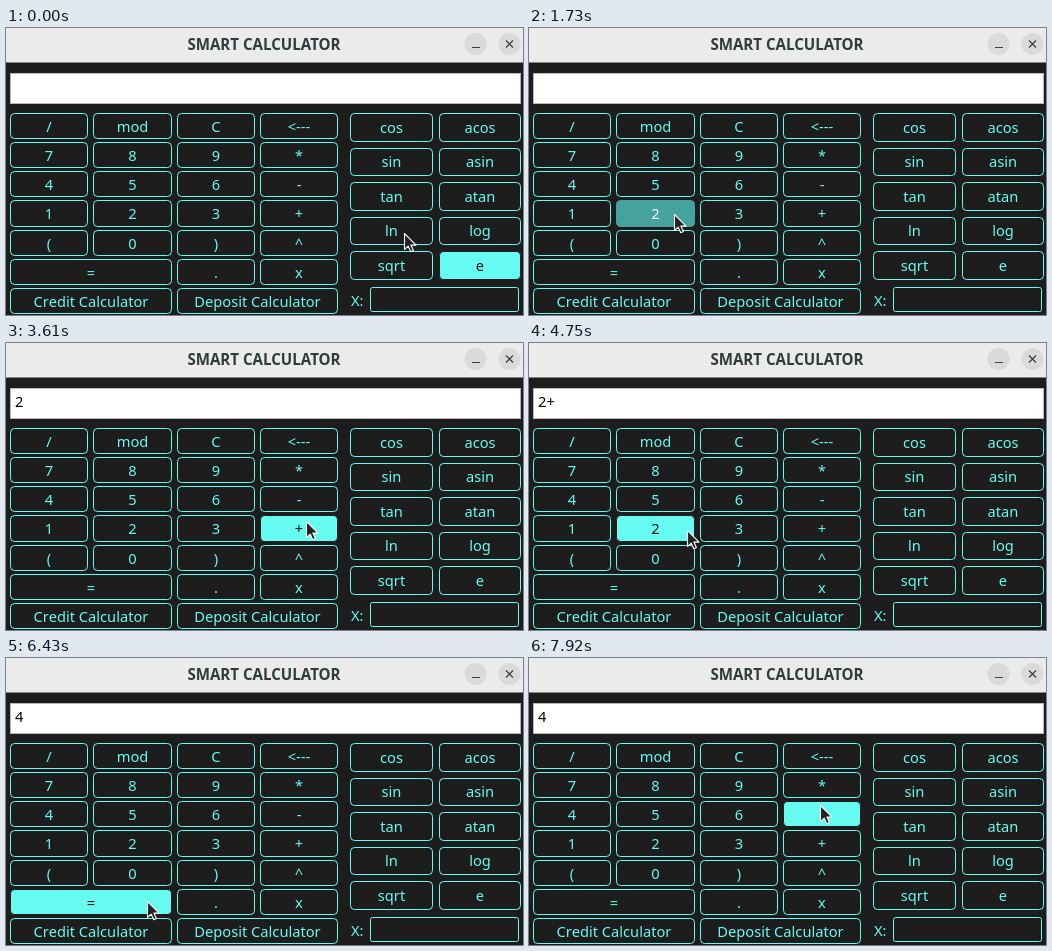
Recreate the animation shown at these times as an HTML page. Size 517x287 px, loop 8000 ms.

```html
<!DOCTYPE html>
<html lang="en">
<head>
<meta charset="utf-8">
<title>Smart Calculator</title>
<style>
  html, body { margin: 0; width: 100%; height: 100%; overflow: hidden; background: #1d1d1d; }
  svg { display: block; width: 517px; height: 287px; }
  text { font: 14.67px "Noto Sans", "Open Sans", sans-serif; fill: #66fcf1; }
  .title { font-size: 15.1px; font-weight: 700; fill: #303b3c; }
  .mid { text-anchor: middle; }
  .btn rect { fill: #1d1d1d; stroke: #66fcf1; }
  .hover rect { fill: #66fcf1; stroke: #1d1d1d; }
  .hover text { fill: #111; }
  .pressed rect { fill: #45a29e; stroke: #45a29e; }
  .pressed text { fill: #fff; }
</style>
</head>
<body>
<svg viewBox="0 0 517 287">
  <rect width="517" height="287" fill="#1d1d1d"/>
  <rect width="517" height="34.5" fill="#ebebeb"/>
  <text class="title mid" x="258" y="22">SMART CALCULATOR</text>
  <g fill="#dadada"><circle cx="469.5" cy="16" r="11"/><circle cx="503.5" cy="16" r="11"/></g>
  <path d="M466 19.5h8M500 12.5l7 7m0-7l-7 7" fill="none" stroke="#3d3d3d" stroke-width="1.2"/>
  <rect x="4.5" y="45.5" width="510" height="30" fill="#fff" stroke="#b8b8b8"/>
  <text id="display" x="9" y="64" style="fill:#000"></text>
  <g id="buttons"></g>
  <text x="345" y="278">X:</text>
  <rect x="364.5" y="259.5" width="148" height="24" rx="2" fill="none" stroke="#66fcf1"/>
  <path id="cursor" d="M.5 .5V16.5L4.2 13.2 6.8 18.8 9.4 17.6 6.9 12.1H12Z" fill="#222" stroke="#fff" stroke-width="1.1" stroke-linejoin="round"/>
</svg>
<script>
const LOOP = 8000;
const TICK = 67.2;
const NS = "http://www.w3.org/2000/svg";
const byId = id => document.getElementById(id);
const buttons = [];

function add(parent, tag, attrs) {
  const node = document.createElementNS(NS, tag);
  for (const key in attrs) node.setAttribute(key, attrs[key]);
  return parent.appendChild(node);
}

function addButton(label, left, top, right, bottom, baseline) {
  const node = add(byId("buttons"), "g", { class: "btn" });
  add(node, "rect", { x: left + .5, y: top + .5, width: right - left - 1, height: bottom - top - 1, rx: 4 });
  const text = add(node, "text", { class: "mid", x: (left + right) / 2, y: baseline });
  text.textContent = label;
  buttons.push({ label, left, top, right, bottom, node });
}

// Labels are split by spaces; "~" widens the button on its left, "_" is a space.
function addGrid(rows, { x, y, w, h, stepX, stepY, baseline }) {
  rows.forEach((row, r) => {
    const cells = row.split(" ");
    const top = y + r * stepY;
    cells.forEach((label, c) => {
      if (label === "~") return;
      const end = cells[c + 1] === "~" ? c + 1 : c;
      const box = [x + c * stepX, top, x + end * stepX + w, top + h, top + baseline];
      addButton(label.replace("_", " "), ...box.map(Math.round));
    });
  });
}

addGrid(
  ["/ mod C <---", "7 8 9 *", "4 5 6 -", "1 2 3 +", "( 0 ) ^", "= ~ . x", "Credit_Calculator ~ Deposit_Calculator ~"],
  { x: 4, y: 84.8, w: 78.2, h: 26.2, stepX: 83.4, stepY: 29.2, baseline: 19 }
);
addGrid(
  ["cos acos", "sin asin", "tan atan", "ln log", "sqrt e"],
  { x: 344, y: 85, w: 82.6, h: 28.9, stepX: 88.6, stepY: 34.5, baseline: 19.9 }
);

// Each pointer move: start, end, and where it comes to rest.
const origin = { x: 398, y: 205 };
const moves = [
  { from: 0, to: 260, x: 236, y: 223 },
  { from: 510, to: 1310, x: 145, y: 186 },
  { from: 2000, to: 2660, x: 178, y: 184 },
  { from: 2680, to: 3530, x: 300, y: 178 },
  { from: 3880, to: 4740, x: 158, y: 187 },
  { from: 5020, to: 5490, x: 141, y: 243 },
  { from: 6440, to: 7180, x: 284, y: 208 },
  { from: 7180, to: 7440, x: 290, y: 148 },
  { from: 7850, to: 7900, x: 291, y: 147 }
];

// Releasing a pressed key updates the display.
const presses = [
  { key: "2", from: 1730, to: 1930, shows: "2" },
  { key: "+", from: 3680, to: 3880, shows: "2+" },
  { key: "2", from: 4880, to: 5020, shows: "2+2" },
  { key: "=", from: 5560, to: 5760, shows: "4" }
];

function pointerAt(time) {
  return moves.reduce((p, move) => {
    const k = Math.min(1, Math.max(0, (time - move.from) / (move.to - move.from)));
    const eased = k * k * (3 - 2 * k);
    return { x: p.x + (move.x - p.x) * eased, y: p.y + (move.y - p.y) * eased };
  }, origin);
}

function render(time) {
  // The pointer is refreshed about 15 times a second.
  const pointer = pointerAt(Math.floor((time + 25) / TICK) * TICK - 20);
  const x = Math.round(pointer.x), y = Math.round(pointer.y);
  const press = presses.find(p => time >= p.from && time < p.to);
  const released = presses.filter(p => time >= p.to).pop();

  for (const b of buttons) {
    const inside = x >= b.left && x < b.right && y >= b.top && y < b.bottom;
    // The previous key stays lit while the pointer first moves away.
    const hover = time < 130 ? b.label === "e" : inside;
    const state = press && press.key === b.label ? " pressed" : hover ? " hover" : "";
    b.node.setAttribute("class", "btn" + state);
  }
  byId("display").textContent = released ? released.shows : "";
  byId("cursor").setAttribute("transform", `translate(${x} ${y})`);
}

const start = performance.now();
function frame() {
  render((performance.now() - start) % LOOP);
  requestAnimationFrame(frame);
}
frame();
</script>
</body>
</html>
```
